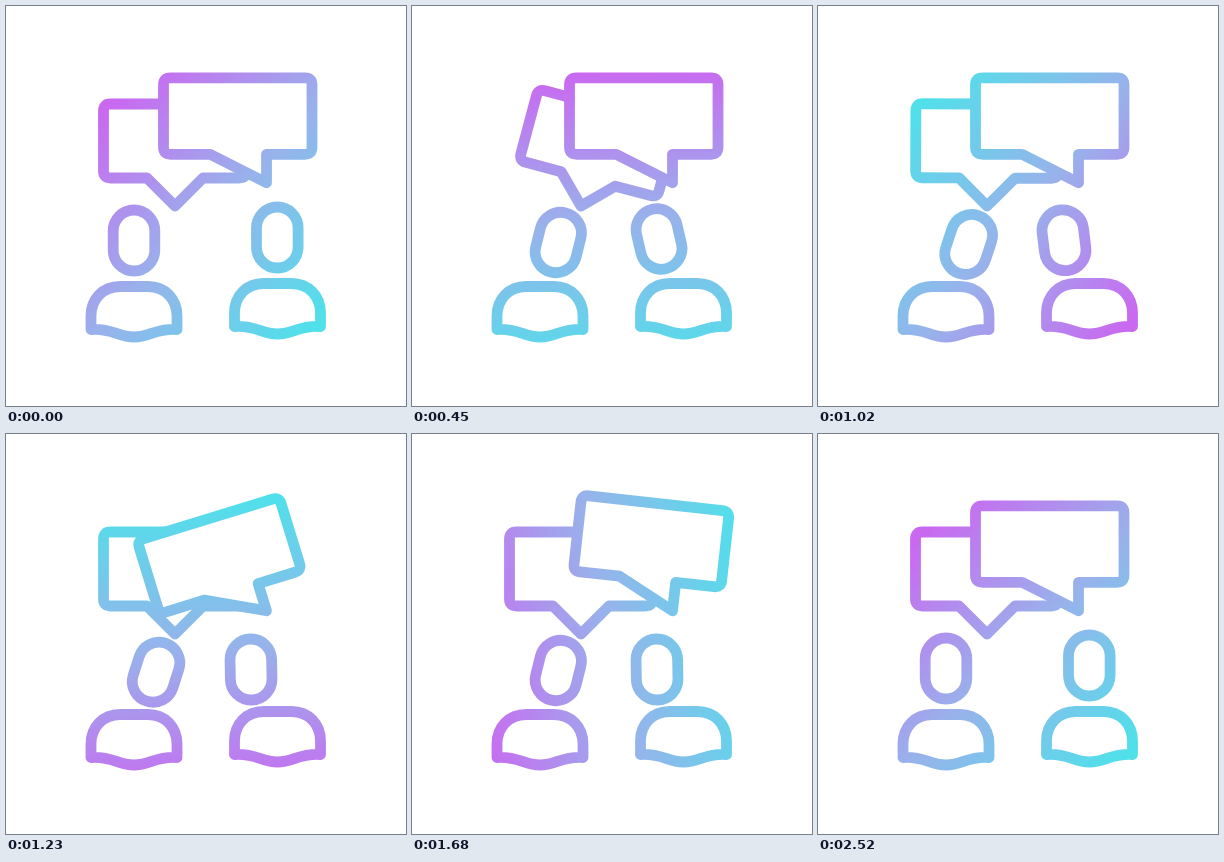
Write an HTML page with a canvas that moves like this. It is 400 by 400 pixels and loops after 4.55 s.

```html
<!DOCTYPE html>
<html lang="en">
<head>
<meta charset="utf-8">
<title>Conversation</title>
<style>
  html, body { margin: 0; width: 100%; height: 100%; overflow: hidden; background: #fff; }
  canvas { display: block; width: 100%; height: 100%; }
</style>
</head>
<body>
<canvas id="stage" width="400" height="400"></canvas>
<script>
const ctx = document.getElementById('stage').getContext('2d');

const LOOP = 4550, ACTIVE = 2520, STEP = 30;
const PURPLE = '#c969f0', BLUE = '#98b2eb', CYAN = '#50e0ea';
const PERSON_DX = 143.5, PERSON_DY = -3;

// Bubbles are drawn around the tip of their tail.
const backBubble = new Path2D(
  'M-64.5 -102 H64.5 Q71.5 -102 71.5 -95 V-35 Q71.5 -28 64.5 -28 H28 L0 0 L-28 -28' +
  ' H-64.5 Q-71.5 -28 -71.5 -35 V-95 Q-71.5 -102 -64.5 -102 Z');
const frontBubble = new Path2D(
  'M-96 -105 H38.5 Q45.5 -105 45.5 -98 V-35.5 Q45.5 -28.5 38.5 -28.5 H0 V0' +
  ' L-56.5 -28.5 H-96 Q-103 -28.5 -103 -35.5 V-98 Q-103 -105 -96 -105 Z');
const head = new Path2D(
  'M-20.8 -9.7 A20.8 20.8 0 0 1 20.8 -9.7 V9.7 A20.8 20.8 0 0 1 -20.8 9.7 Z');
// The body stands on its lowest point.
const body = new Path2D(
  'M-43 -7.5 V-21 C-43 -38 -31 -50.5 -14 -50.5 H14 C31 -50.5 43 -38 43 -21 V-7.5' +
  ' C22 -9 16 0 0 0 S-22 -9 -43 -7.5 Z');

const clamp = v => Math.min(1, Math.max(0, v));
const mix = (a, b, p) => a + (b - a) * p;
const smooth = p => (1 - Math.cos(Math.PI * p)) / 2;
const move = (t, from, to) => smooth(clamp((t - from) / (to - from)));
const bump = (t, from, to) => Math.sin(Math.PI * clamp((t - from) / (to - from)));

function track(t, keys) {
  let value = keys[0][1];
  for (let i = 1; i < keys.length; i++) {
    value = mix(value, keys[i][1], move(t, keys[i - 1][0], keys[i][0]));
  }
  return value;
}

// Eased progress along cubic-bezier(x1, 0, x2, 1)
function ease(p, x1, x2) {
  let lo = 0, hi = 1;
  for (let i = 0; i < 24; i++) {
    const s = (lo + hi) / 2, r = 1 - s;
    if (3 * r * r * s * x1 + 3 * r * s * s * x2 + s * s * s < p) lo = s;
    else hi = s;
  }
  return lo * lo * (3 - 2 * lo);
}

const swing = t => track(t, [[0, 0], [150, -20.5], [440, 15], [730, -8.6], [930, 1.5], [1050, 0]]);

function place(shape, x, y, angle = 0, sx = 1, sy = 1) {
  const path = new Path2D();
  path.addPath(shape, new DOMMatrix().translate(x, y).rotate(angle).scale(sx, sy));
  return path;
}

function gradient(t) {
  const a = (44 + 360 * ease(t / ACTIVE, 0.3, 0.47)) * Math.PI / 180;
  const x = 150 * Math.cos(a), y = 150 * Math.sin(a);
  const g = ctx.createLinearGradient(200 - x, 216 - y, 200 + x, 216 + y);
  g.addColorStop(0, PURPLE);
  g.addColorStop(0.5, BLUE);
  g.addColorStop(1, CYAN);
  return g;
}

function drawPerson(pose, squash, dx, dy) {
  const sx = 1 + 0.045 * squash, sy = 1 - 0.035 * squash;
  ctx.stroke(place(body, 128 + dx, 331 + dy + squash, 0, sx, sy));
  ctx.stroke(place(head, pose.x, pose.y + 4 * squash, pose.tilt, sx, sy));
}

function leftPose(t) {
  const lean = move(t, 0, 400) - move(t, 2070, 2500);
  const nod = bump(t, 500, 1650) ** 2;
  return {
    x: 128 + 18.3 * lean + 4.5 * nod,
    y: 234.5 + 2 * lean + 2 * nod,
    tilt: 14 * lean + 4.5 * nod
  };
}

function rightPose(t) {
  const lean = move(t, 0, 420), rise = move(t, 800, 1240), back = move(t, 1740, 2150);
  return {
    x: 271.3 - 24.3 * lean - 2 * rise + 26.3 * back,
    y: 231.5 + 1.5 * lean + 2.5 * rise - 4 * back,
    tilt: -13 * lean + 12 * rise + back
  };
}

function draw(t) {
  ctx.fillStyle = '#fff';
  ctx.fillRect(0, 0, 400, 400);
  ctx.strokeStyle = gradient(t);
  ctx.lineWidth = 10.8;
  ctx.lineJoin = ctx.lineCap = 'round';

  ctx.stroke(place(backBubble, 169, 200, swing(t)));
  const front = place(frontBubble, 260.5, 176.8, swing(t - 1120));
  ctx.fill(front);
  ctx.stroke(front);

  drawPerson(leftPose(t), bump(t, 0, 400) + bump(t, 2070, 2500), 0, 0);
  drawPerson(rightPose(t), bump(t, 0, 420) + bump(t, 1740, 2150), PERSON_DX, PERSON_DY);
}

const start = performance.now();
function tick() {
  const t = (performance.now() - start) % LOOP;
  draw(Math.min(ACTIVE, Math.floor(t / STEP) * STEP));
  requestAnimationFrame(tick);
}
tick();
</script>
</body>
</html>
```
